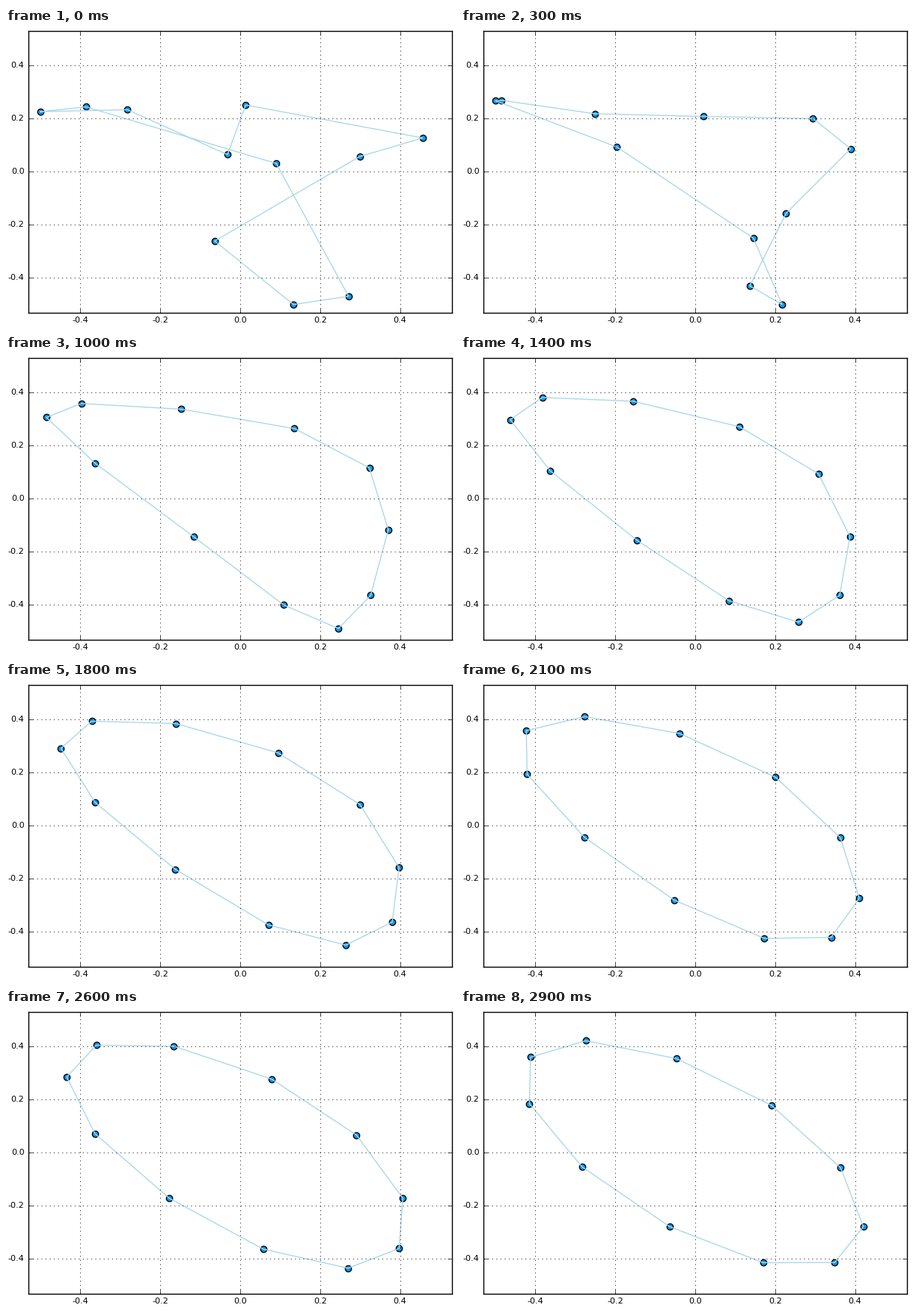
A matplotlib script that plays this animation: 600x400 px, repeating every 3000 ms.

```python
import numpy as np
import matplotlib.pyplot as plt
from matplotlib.animation import FuncAnimation

WIDTH, HEIGHT, DPI = 600, 400, 100
FRAMES, INTERVAL = 30, 100
LIMIT, CAP = 0.53, 0.5

# Corners of the tangled starting polygon, in drawing order.
# Every later pose follows from these by averaging.
X = [-.5, -.282, -.032, .0135, .457, .299, -.064, .133, .271, .09, -.386]
Y = [.226, .233, .064, .251, .127, .057, -.261, -.5, -.469, .031, .244]
START = np.column_stack([X, Y])


def normalise(points):
    """Centre, scale each axis to unit norm and keep it within the cap."""
    points = points - points.mean(axis=0)
    points = points / np.linalg.norm(points, axis=0)
    return points * np.minimum(1, CAP / np.abs(points).max(axis=0))


def polygon(step):
    """Replace the corners by the edge midpoints, step times over."""
    points = START
    for _ in range(step):
        points = (points + np.roll(points, -1, axis=0)) / 2
    return normalise(points)


plt.style.use("classic")
plt.rcParams.update({
    "font.family": "DejaVu Sans",
    "axes.unicode_minus": False,
})

fig = plt.figure(figsize=(WIDTH / DPI, HEIGHT / DPI), dpi=DPI, facecolor="white")
left, right, top, bottom = 30, 596, 3.6, 380.6
ax = fig.add_axes([left / WIDTH, 1 - bottom / HEIGHT,
                   (right - left) / WIDTH, (bottom - top) / HEIGHT])
ax.set(xlim=(-LIMIT, LIMIT), ylim=(-LIMIT, LIMIT))

ticks = np.arange(-2, 3) / 5
labels = [f"{t:.1f}" for t in ticks]
ax.set_xticks(ticks, labels)
ax.set_yticks(ticks, labels)
ax.tick_params(labelsize=8)
ax.grid(True)

dots, = ax.plot([], [], "o", ms=6, mfc="#009afa", mec="black", mew=1)
outline, = ax.plot([], [], color="lightblue", lw=1)


def draw(step):
    points = polygon(step)
    dots.set_data(*points.T)
    outline.set_data(*np.vstack([points, points[:1]]).T)
    return dots, outline


anim = FuncAnimation(fig, draw, frames=FRAMES, interval=INTERVAL,
                     repeat=True, repeat_delay=0)
plt.show()
```
